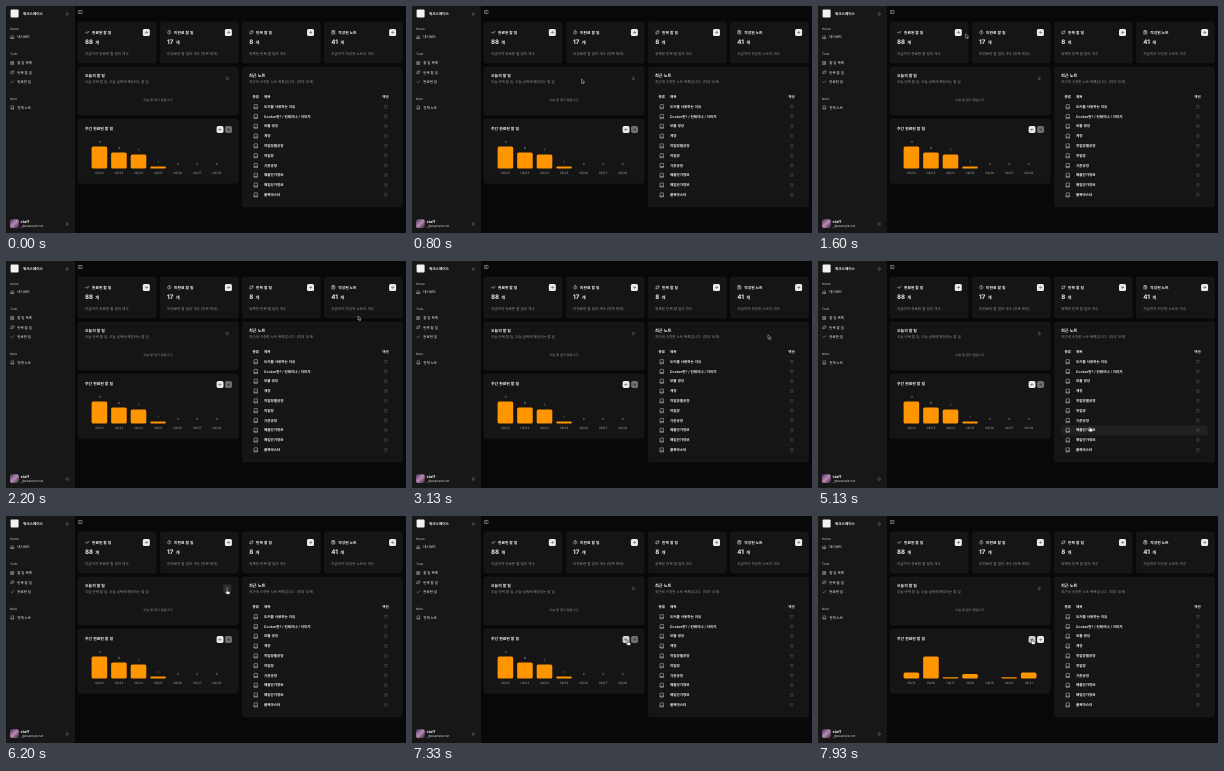
Recreate the animation shown at these times as an HTML page. Size 400 by 227 pixels, loop 8000 ms.

```html
<!DOCTYPE html>
<html lang="ko">
<head>
<meta charset="utf-8">
<title>Dashboard</title>
<style>
html, body { margin: 0; width: 100%; height: 100%; overflow: hidden; background: #080808; }
svg { display: block; width: 100vw; height: 100vh; }
text {
  font-family: Inter, "Noto Sans CJK KR", "Noto Sans CJK JP", "Noto Sans CJK", sans-serif;
  text-rendering: geometricPrecision; white-space: pre;
}
</style>
</head>
<body>
<svg id="stage" viewBox="0 0 400 227">
  <defs>
    <linearGradient id="photo" x1="0" y1="0" x2="1" y2="1">
      <stop offset="0" stop-color="#43305f"/>
      <stop offset=".5" stop-color="#b98bb0"/>
      <stop offset="1" stop-color="#35213f"/>
    </linearGradient>
  </defs>
</svg>
<script>
const LOOP = 8000, CLICK = 7530, BAR_TIME = 420;
const BASE = 162.4, UNIT = 2, BAR_W = 15.6;
const WHITE = '#f2f2f2', GRAY = '#929292', LINE = '#222', CARD = '#151515';
const stage = document.getElementById('stage');

const ICON = {
  house: 'M3 10l9-7 9 7v11H3zM9 21v-8h6v8',
  list: 'M4 3h16v18H4zM8 8h8M8 12h8M8 16h8',
  repeat: 'M17 2l4 4-4 4M3 11v-1a4 4 0 0 1 4-4h14M7 22l-4-4 4-4M21 13v1a4 4 0 0 1-4 4H3',
  check: 'M4 13l5 5L20 6',
  checks: 'M2 12l5 5L18 6M12 17l1 1L22 8',
  alert: 'M12 2a10 10 0 1 0 .01 0M12 7v6M12 17v.1',
  clipboard: 'M4 4h16v18H4zM9 2h6v4H9zM8 11h8M8 16h8',
  book: 'M4 19.5v-15A2.5 2.5 0 0 1 6.5 2H20v20H6.5a2.5 2.5 0 0 1 0-5H20',
  trash: 'M3 6h18M19 6v15H5V6M8 6V3h8v3M10 11v6M14 11v6',
  right: 'M5 12h14M12 5l7 7-7 7',
  left: 'M19 12H5M12 5l-7 7 7 7',
  updown: 'M7 15l5 5 5-5M7 9l5-5 5 5',
  panel: 'M3 3h18v18H3zM9 3v18'
};

function add(tag, attrs, parent = stage) {
  const node = document.createElementNS('http://www.w3.org/2000/svg', tag);
  for (const k in attrs) node.setAttribute(k, attrs[k]);
  return parent.appendChild(node);
}
const rect = (x, y, width, height, fill, rx = 0, stroke = 'none') =>
  add('rect', { x, y, width, height, fill, rx, stroke, 'stroke-width': .3 });

// y is the middle of the line
function text(str, x, y, size, fill = WHITE, weight = 400, anchor = 'start') {
  const node = add('text', { x, y: y + size * .36, 'font-size': size, fill, 'font-weight': weight, 'text-anchor': anchor });
  node.textContent = str;
  return node;
}
function icon(name, cx, cy, size, stroke = WHITE, width = 2) {
  const k = size / 24;
  return add('path', {
    d: ICON[name], fill: 'none', stroke, 'stroke-width': width, 'stroke-linecap': 'round',
    'stroke-linejoin': 'round', transform: `translate(${cx - size / 2} ${cy - size / 2}) scale(${k})`
  });
}
const card = (x, y, w, h) => rect(x, y, w, h, CARD, 2.2, LINE);

// Boxes that change fill under the pointer
const targets = [];
function hoverRect(x, y, w, h, normal, hover, rx = 0) {
  targets.push({ node: rect(x, y, w, h, normal, rx), x, y, w, h, normal, hover });
}

rect(0, 0, 400, 227, '#080808');

// Sidebar
rect(0, 0, 68.7, 227, '#171717');
rect(68.5, 0, .3, 227, LINE);
rect(4.6, 3.6, 8, 8, WHITE, 1);
text('워크스페이스', 17, 7.4, 3.6, WHITE, 600);
icon('updown', 61.2, 8, 4.2);
for (const [label, y] of [['Home', 22.5], ['Todo', 48], ['Note', 93.2]]) text(label, 4, y, 3.1, '#b5b5b5', 500);
for (const [name, label, y] of [
  ['house', '대시보드', 31], ['list', '할 일 목록', 57], ['repeat', '반복 할 일', 66.3],
  ['check', '완료한 일', 75.8], ['book', '전체 노트', 101.5]
]) {
  icon(name, 6.3, y, 4);
  text(label, 11.2, y, 3.5, WHITE, 500);
}
rect(4, 213.2, 8.8, 8.8, 'url(#photo)', 2);
text('staff', 14.6, 215.4, 3.9, WHITE, 600);
text('_@example.net', 14.6, 220.2, 3.2, '#d5d5d5');
icon('updown', 61.2, 218, 4.2);
icon('panel', 74.5, 6, 4.2);

// Counters
[
  ['checks', '완료된 할 일', 88, '지금까지 완료한 할 일의 개수'],
  ['alert', '미완료 할 일', 17, '미완료된 할 일의 개수 (반복 제외)'],
  ['repeat', '반복 할 일', 8, '등록된 반복 할 일의 개수'],
  ['clipboard', '작성된 노트', 41, '지금까지 작성된 노트의 개수']
].forEach(([name, title, count, note], i) => {
  const x = 72 + i * 82.1;
  card(x, 16, 78.3, 41);
  icon(name, x + 9.2, 26.3, 4.2, WHITE, 2.4);
  text(title, x + 13.9, 26.2, 3.8, WHITE, 600);
  const bx = x + 64.8, by = 22.9;
  hoverRect(bx, by, 7, 7, '#ececec', '#cfcfcf', 1.5);
  icon('right', bx + 3.5, by + 3.5, 4, '#111', 2.4);
  const num = text(count, x + 7, 36.1, 6.2, WHITE, 700);
  const unit = add('tspan', { 'font-size': 4.3, 'font-weight': 600, dx: 2.3 }, num);
  unit.textContent = '개';
  text(note, x + 7, 48.2, 3.6, GRAY);
});

// Today
card(72, 61, 160.4, 48);
text('오늘의 할 일', 79, 69.8, 3.9, WHITE, 600);
text('오늘 반복 할 일, 오늘 날짜에 해당되는 할 일', 79, 76.2, 3.5, GRAY);
hoverRect(217.2, 68.3, 8.2, 8.4, CARD, '#2b2b2b', 1.5);
icon('updown', 221.3, 72.5, 4.2);
rect(79, 84.3, 146.6, 18.8, 'none', 1.5, LINE);
text('오늘 할 일이 없습니다.', 152.3, 93.8, 3.2, GRAY, 400, 'middle');

// Recent notes
card(236.2, 61, 160.4, 140);
text('최근 노트', 243, 69.8, 4.2, WHITE, 600);
text('최근에 수정한 노트 목록입니다. (최대 10개)', 243, 76.2, 3.55, GRAY);
text('종류', 249.7, 90.6, 3.5, WHITE, 600, 'middle');
text('제목', 258, 90.6, 3.5, WHITE, 600);
text('액션', 379.6, 90.6, 3.5, WHITE, 600, 'middle');
[
  '도커를 사용하는 이유', 'Docker란? / 컨테이너 / 이미지', '모듈 생성', '계정', '작업장별공정',
  '작업장', '기준공정', '매출단가정보', '매입단가정보', '품목마스터'
].forEach((title, i) => {
  const y = 95.8 + i * 9.8;
  hoverRect(243, y, 146.6, 9.8, CARD, '#202020');
  rect(243, y - .15, 146.6, .3, LINE);
  icon('book', 249.7, y + 4.9, 5);
  text(title, 258, y + 4.8, 3.55, WHITE, 600);
  icon('trash', 379.8, y + 4.9, 4.2, '#575757', 1.8);
});

// Weekly chart
card(72, 113, 160.4, 64.3);
text('주간 완료된 할 일', 79, 122.8, 3.9, WHITE, 600);
hoverRect(210.6, 120.1, 6.9, 6.9, '#ececec', '#d2d2d2', 1.7);
icon('left', 214, 123.6, 3.8, '#111', 2.4);
const next = rect(219.1, 120.1, 6.9, 6.9, WHITE, 1.7);
icon('right', 222.5, 123.6, 3.8, '#111', 2.4);

const WEEKS = [[11, 8, 7, 1, 0, 0, 0], [3, 11, .6, 2.2, 0, .6, 3]];
const bars = WEEKS[0].map((value, i) => {
  const cx = 93.4 + i * 19.55;
  return {
    bar: add('path', { fill: '#ff9500' }), cx,
    value: text(value, cx, BASE - value * UNIT - 4.5, 3, '#aaa', 400, 'middle'),
    day: text('', cx, 167.3, 3.1, '#9a9a9a', 400, 'middle')
  };
});

function drawChart(t) {
  const moved = t >= CLICK;
  const p = Math.min(1, Math.max(0, (t - CLICK + 40) / BAR_TIME));
  const k = moved ? 1 - (1 - p) ** 3 : 0;
  bars.forEach(({ bar, cx, value, day }, i) => {
    const h = (WEEKS[0][i] + (WEEKS[1][i] - WEEKS[0][i]) * k) * UNIT;
    const r = Math.min(1.5, h / 2), x = cx - BAR_W / 2;
    bar.setAttribute('d', h < .1 ? '' :
      `M${x} ${BASE - r}v${2 * r - h}q0 ${-r} ${r} ${-r}h${BAR_W - 2 * r}q${r} 0 ${r} ${r}` +
      `v${h - 2 * r}q0 ${r} ${-r} ${r}h${2 * r - BAR_W}q${-r} 0 ${-r} ${-r}z`);
    value.setAttribute('visibility', moved ? 'hidden' : 'visible');
    day.textContent = '08/' + (i + (moved ? 15 : 22));
  });
  next.setAttribute('fill', moved ? '#ececec' : '#707070');
}

// Pointer: time, x, y
const PATH = [
  [200, 300, 112], [330, 296, 106], [470, 284, 100], [800, 169.5, 73], [1270, 141, 27], [1530, 141, 27],
  [2200, 352, 55], [2400, 353, 55], [2800, 386, 27], [2920, 386, 27], [3240, 345, 91],
  [4000, 270, 101], [4130, 270, 101], [4930, 273, 168], [5060, 273, 168],
  [5830, 227, 80], [6200, 221, 73.5], [6670, 221, 73.5], [7330, 215.8, 124.5], [7530, 214.4, 123.6], [8000, 214.4, 123.6]
];
const pointer = add('g', {});
const shape = (d, fill, stroke) => add('path', { d, fill, stroke, 'stroke-width': .5, 'stroke-linejoin': 'round' }, pointer);
const arrow = shape('M0 0v4.6l1.1-1 .8 1.8.9-.4-.8-1.7h1.5z', '#050505', '#e8e8e8');
const hand = shape('M-.6 .2q.6-.7 1.2 0v1.7l2.2.5q.6.2.5.9l-.4 2H-.4L-2 3.2q0-.9.8-.6l.6.6z', '#fff', '#111');

function position(t) {
  const i = PATH.findIndex(p => p[0] > t);
  if (i < 1) return [-50, -50];
  const [t0, x0, y0] = PATH[i - 1], [t1, x1, y1] = PATH[i];
  const u = (t - t0) / (t1 - t0), k = u * u * (3 - 2 * u);
  return [x0 + (x1 - x0) * k, y0 + (y1 - y0) * k];
}

function drawPointer(t) {
  const [x, y] = position(t);
  let over = false;
  for (const b of targets) {
    const hit = x >= b.x && x <= b.x + b.w && y >= b.y && y <= b.y + b.h;
    b.node.setAttribute('fill', hit ? b.hover : b.normal);
    over = over || hit;
  }
  pointer.setAttribute('transform', `translate(${x} ${y}) scale(.9)`);
  arrow.setAttribute('visibility', over ? 'hidden' : 'visible');
  hand.setAttribute('visibility', over ? 'visible' : 'hidden');
}

function frame() {
  const t = performance.now() % LOOP;
  drawChart(t);
  drawPointer(t);
  requestAnimationFrame(frame);
}
frame();
</script>
</body>
</html>
```
